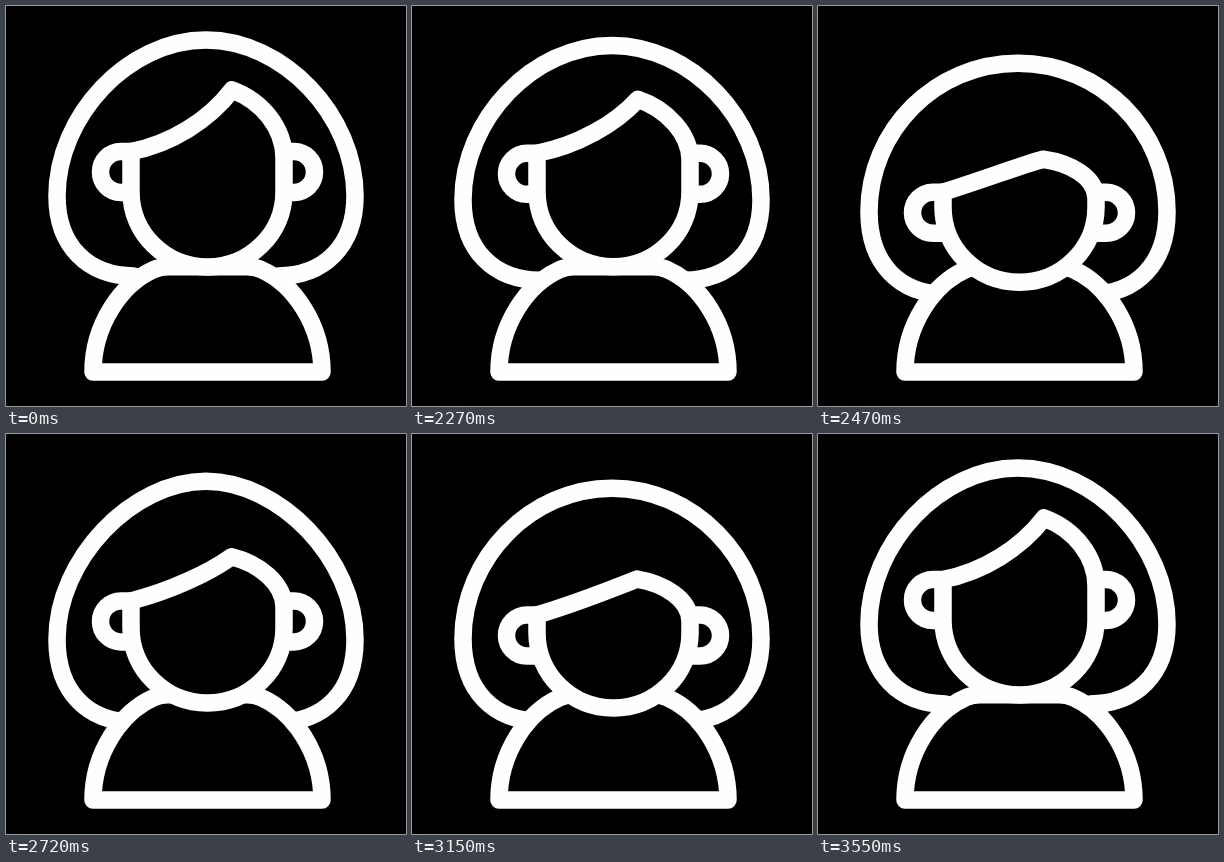
Write an HTML page that moves like this. It is 400x400 px and loops after 3570 ms.

```html
<!DOCTYPE html>
<html lang="en">
<head>
<meta charset="utf-8">
<title>Nodding avatar</title>
<style>
  html, body { margin: 0; width: 100%; height: 100%; overflow: hidden; background: #000; }
  svg { display: block; width: 100%; height: 100%; }
  path { fill: #000; stroke: #fefefe; stroke-width: 17.5px; stroke-linecap: round; stroke-linejoin: round; }
</style>
</head>
<body>
<svg viewBox="0 0 400 400">
  <path id="hair"/>
  <path id="body" d="M87 366 C87 319 115 278 148 263.500 Q154 260.700 162 260.700 H241 Q249 260.700 255 263.500 C288 278 316 319 316 366 Z"/>
  <path id="ears"/>
  <path id="face"/>
</svg>
<script>
const LOOP = 3570, REST = 2020;

// Vertical offsets of each part at the turning points of the nod
const KEYS = [
  { at: 1990, top: 0,    low: 0,  ear: 0,    peak: 0,  chin: 0 },
  { at: 2145, top: 0,    low: 0,  ear: -10,  peak: -9, chin: -5 },
  { at: 2520, top: 24,   low: 19, ear: 42.5, peak: 72, chin: 16 },
  { at: 2780, top: 12,   low: 18, ear: 19,   peak: 35, chin: 7 },
  { at: 3035, top: 22.5, low: 19, ear: 39.5, peak: 68, chin: 14.5 },
  { at: 3550, top: 0,    low: 0,  ear: 0,    peak: 0,  chin: 0 }
];

const [hair, ears, face] = ["hair", "ears", "face"].map(id => document.getElementById(id));
const ease = u => u < 0.5 ? 2 * u * u : 1 - 2 * (1 - u) * (1 - u);

function poseAt(t) {
  if (t < REST) return KEYS[0];
  const i = KEYS.findIndex(k => k.at > t);
  if (i < 0) return KEYS[KEYS.length - 1];
  const a = KEYS[i - 1], b = KEYS[i];
  const u = ease((t - a.at) / (b.at - a.at));
  const pose = {};
  for (const k in a) pose[k] = a[k] + (b[k] - a[k]) * u;
  return pose;
}

function hairPath({ top, low }) {
  const crown = 34 + top, temple = 110 + 0.8 * low;
  const side = 190 + 0.85 * low, curl = 240 + low, end = 270 + low;
  const round = 122 + low - top;
  return `M128 ${end} C82 ${end} 51 ${curl} 51 ${side}
    C51 ${temple} ${round} ${crown} 200 ${crown}
    S349 ${temple} 349 ${side}
    C349 ${curl} 318 ${end} 272 ${end}`;
}

function earsPath({ ear }) {
  const y = 145.5 + ear;
  return `M127 ${y} H115 a20.500 20.500 0 0 0 0 41 H127
    M276 ${y} H288 a20.500 20.500 0 0 1 0 41 H276`;
}

function facePath({ ear, peak, chin }) {
  const brow = 145.5 + ear, tip = 84 + peak, px = 226 - peak / 70;
  const jaw = 186 + chin, cheek = 227.5 + chin, low = 261 + chin;
  return `M125 ${brow} V${jaw}
    C125 ${cheek} 159.500 ${low} 201.500 ${low}
    S278 ${cheek} 278 ${jaw}
    V${152 + ear}
    C278 ${122 + 0.7 * peak} ${256 - 0.08 * peak} ${95 + 0.89 * peak} ${px} ${tip}
    C203 ${114 + 0.5 * ear + 0.36 * peak} 165 ${138 + 0.88 * ear} 125 ${brow} Z`;
}

function draw(t) {
  const pose = poseAt(t);
  hair.setAttribute("d", hairPath(pose));
  ears.setAttribute("d", earsPath(pose));
  face.setAttribute("d", facePath(pose));
}

const start = performance.now();
function tick() {
  draw((performance.now() - start) % LOOP);
  requestAnimationFrame(tick);
}
tick();
</script>
</body>
</html>
```
